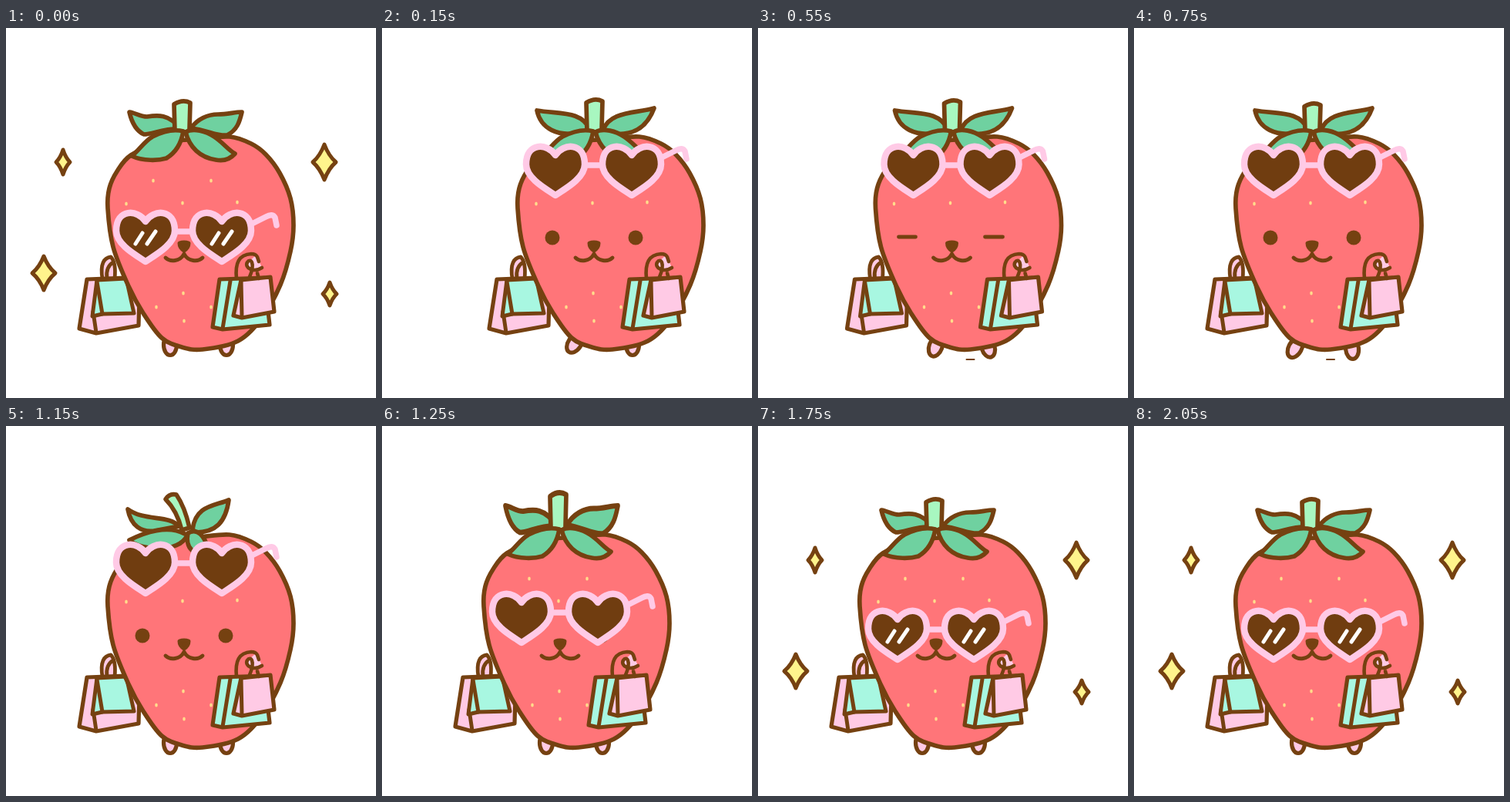
An HTML page with a canvas for the animation above (2200 ms loop, 480x480 px).

```html
<!DOCTYPE html>
<html>
<head>
<meta charset="utf-8">
<style>
html, body { margin: 0; width: 100%; height: 100%; overflow: hidden; background: #fff; }
canvas { display: block; width: 480px; height: 480px; }
</style>
</head>
<body>
<canvas id="stage" width="480" height="480"></canvas>
<script>
const ctx = document.getElementById('stage').getContext('2d');
const LOOP = 2200;
const BROWN = '#754111', RED = '#ff7579', PINK = '#ffcae5', FRAME = '#ffcae6';
const MINT = '#a8f7e1', LEAF = '#6fd1a0', STEM = '#a8f7c0', YELLOW = '#fff48c', SEED = '#ffdc8c';

// Shapes are drawn where the strawberry stands still.
const BODY = [
  [255, 417], [228, 414], [202, 402], [178, 370], [159, 335], [139, 284], [132, 234],
  [134, 208], [144, 186], [162, 165], [200, 149], [250, 144], [290, 141], [318, 150],
  [337, 164], [355, 188], [369, 221], [373, 256], [369, 290], [356, 333], [332, 376], [301, 406]
];
const SEEDS = [[156, 228], [229, 227], [300, 226], [191, 198], [266, 198],
  [195, 362], [230, 344], [266, 362], [231, 380]];
const SPARKLES = [[74, 174, 9, 16], [413, 174, 15, 23], [49, 318, 15, 22], [420, 345, 9, 15]];

const LOWER = ['M230 134C215 130 200 136 190 141C178 148 172 160 163 166C178 173 198 172 208 169C218 163 227 152 230 134Z',
  'M233 135C243 129 260 134 270 141C282 149 288 158 297 163C290 171 282 173 272 171C252 168 238 155 233 135Z'];
const LEAVES = {
  rest: { upper: ['M226 131C212 111 196 113 183 115C174 115 168 110 160 109C163 122 168 133 179 138C190 138 205 130 226 131Z',
    'M240 130C248 118 262 112 275 112C288 112 296 109 306 109C303 122 300 132 287 139C275 141 260 132 240 130Z'], lower: LOWER },
  walk: { upper: ['M226 132C215 107 186 112 157 107C162 131 184 141 212 136Z',
    'M243 132C252 108 284 111 309 104C299 131 280 140 254 137Z'], lower: LOWER },
  toss: { upper: ['M224 130C212 115 180 124 158 108C162 130 176 138 192 136Z',
    'M242 134C246 103 270 104 289 96C285 125 272 138 246 138Z'],
    lower: ['M232 140C210 128 180 138 160 148C175 162 225 165 235 142Z',
      'M236 139C248 132 258 142 262 160C245 172 232 158 236 139Z'],
    stem: 'M228 135Q222 110 207 95Q212 87 221 89Q232 105 238 132Z' }
};

const STAND = [[213, 411, 0], [286, 411, 0]];
const POSES = [
  { at: 0, leaves: 'rest', drop: 86, cool: true },
  { at: 150, x: 44, stemTop: 94, feet: [[206, 409, 0.6], [281, 411, 0]] },
  { at: 350, x: 32.5, stemTop: 94, feet: [[212, 412, 0.2], [281, 414, -0.2]] },
  { at: 550, x: 20.5, stemTop: 95, blink: true, dash: true, feet: [[210, 413, 0.35], [278, 414, -0.3]] },
  { at: 750, stemTop: 99, dash: true, feet: [[209, 415, 0.5], [283, 416, -0.1]] },
  { at: 950, stemTop: 99 },
  { at: 1150, leaves: 'toss' },
  { at: 1200, leaves: 'toss', lift: 1.45, drop: 24 },
  { at: 1250, leaves: 'rest', lift: 1.2, drop: 64 },
  { at: 1300, leaves: 'rest', drop: 86, cool: true }
];

function shape(d, fill, line = 5.7, color = BROWN) {
  const path = typeof d === 'string' ? new Path2D(d) : d;
  if (fill) { ctx.fillStyle = fill; ctx.fill(path); }
  if (line) { ctx.lineWidth = line; ctx.strokeStyle = color; ctx.stroke(path); }
}

function dot(x, y, rx, ry, fill) {
  ctx.fillStyle = fill;
  ctx.beginPath();
  ctx.ellipse(x, y, rx, ry, 0, 0, Math.PI * 2);
  ctx.fill();
}

function closedCurve(points) {
  const path = new Path2D(), n = points.length;
  const at = i => points[(i + n) % n];
  path.moveTo(...points[0]);
  for (let i = 0; i < n; i++) {
    const [a, b, c, d] = [at(i - 1), at(i), at(i + 1), at(i + 2)];
    path.bezierCurveTo(b[0] + (c[0] - a[0]) / 6, b[1] + (c[1] - a[1]) / 6,
      c[0] - (d[0] - b[0]) / 6, c[1] - (d[1] - b[1]) / 6, c[0], c[1]);
  }
  path.closePath();
  return path;
}
const bodyPath = closedCurve(BODY);

function drawFoot([x, y, turn]) {
  const path = new Path2D();
  path.ellipse(x, y, 8.5, 13.5, turn, 0, Math.PI * 2);
  shape(path, PINK, 5.2);
}

function drawLeftBags() {
  shape('M125 325C122 306 127 298 136 297C142 303 142 315 141 325', PINK, 4.8);
  shape('M131 325Q129 310 139 304', null, 4.8);
  shape('M105 326L155 324L173 350L172 386L117 396L95 390Z', PINK, 5.2);
  shape('M113 368L117 395', null, 5);
  shape('M118 327L156 325L166 370L125 371L112 374Z', MINT, 5);
  shape('M118 329L125 371', null, 5);
}

function drawRightBags() {
  shape('M277 326L335 324L342 385L281 391L268 388Z', MINT, 5.2);
  shape('M291 328L281 390', null, 5);
  shape('M305 327L343 323L348 368L306 376L295 373Z', PINK, 5.2);
  shape('M305 328L306 375', null, 5);
  shape('M312 306L325 294L332 311L322 316Z', PINK, 0);
  shape('M299 325C297 305 302 294 318 293Q324 293 326 297L328 303M332 311C321 318 309 311 313 304C317 298 324 304 316 323M326 318L328 325', null, 4.6);
}

function drawFace(pose) {
  if (!pose.cool) {
    if (pose.blink) shape('M162 271H184M274 271H297', null, 4.8);
    else [177, 285].forEach(x => dot(x, 272, 9.5, 9.5, BROWN));
  }
  shape('M225 279Q231 277 237 279Q237 285 231 289Q225 285 225 279Z', BROWN, 5);
  shape('M207 298C213 304 226 303 231 293C236 303 249 304 255 298', null, 4.9);
}

function drawLeaves(pose) {
  const set = LEAVES[pose.leaves || 'walk'];
  const top = pose.stemTop || 96;
  const side = set === LEAVES.rest ? -1 : 2;
  const stem = set.stem ||
    `M${220 + side} 134L${219 + side} ${top + 3}Q${230 + side} ${top - 4} ${240 + side} ${top + 1}L${239 + side} 132`;
  ctx.save();
  ctx.translate(0, 137);
  ctx.scale(1, pose.lift || 1);
  ctx.translate(0, -137);
  set.upper.forEach(d => shape(d, LEAF));
  shape(stem, STEM);
  ctx.restore();
  set.lower.forEach(d => shape(d, LEAF));
}

function drawGlasses(pose) {
  ctx.save();
  ctx.translate(0, pose.drop || 0);
  shape('M222 178H240M319 168L337 159Q346 154 349 160L351 170', null, 7.5, FRAME);
  for (const x of [181, 280]) {
    ctx.save();
    ctx.translate(x, 0);
    shape('M0 165C-10 149-38 148-38 177C-38 195-12 209 0 217C12 209 38 195 38 177C38 148 10 149 0 165Z',
      '#703d10', 8.5, FRAME);
    if (pose.cool) shape('M-13 194L-4 180M2 194L13 178', null, 5, '#fff');
    ctx.restore();
  }
  ctx.restore();
}

function drawSparkle([x, y, w, h]) {
  const a = w * 0.36, b = h * 0.36;
  shape(`M${x} ${y - h}Q${x + a} ${y - b} ${x + w} ${y}Q${x + a} ${y + b} ${x} ${y + h}` +
    `Q${x - a} ${y + b} ${x - w} ${y}Q${x - a} ${y - b} ${x} ${y - h}Z`, YELLOW, 5);
}

function draw(time) {
  const pose = POSES.filter(p => p.at <= time).pop();
  ctx.fillStyle = '#fff';
  ctx.fillRect(0, 0, 480, 480);
  ctx.lineCap = ctx.lineJoin = 'round';
  if (pose.cool) SPARKLES.forEach(drawSparkle);

  ctx.save();
  ctx.translate(pose.x || 0, 0);
  drawLeftBags();
  (pose.feet || STAND).forEach(drawFoot);
  if (pose.dash) shape('M250 430H260', null, 2);
  shape(bodyPath, RED);
  SEEDS.forEach(([x, y]) => dot(x, y, 1.8, 2.5, SEED));
  drawFace(pose);
  drawLeaves(pose);
  drawGlasses(pose);
  drawRightBags();
  ctx.restore();
}

const start = performance.now();
function tick() {
  draw((performance.now() - start) % LOOP);
  requestAnimationFrame(tick);
}
tick();
</script>
</body>
</html>
```
